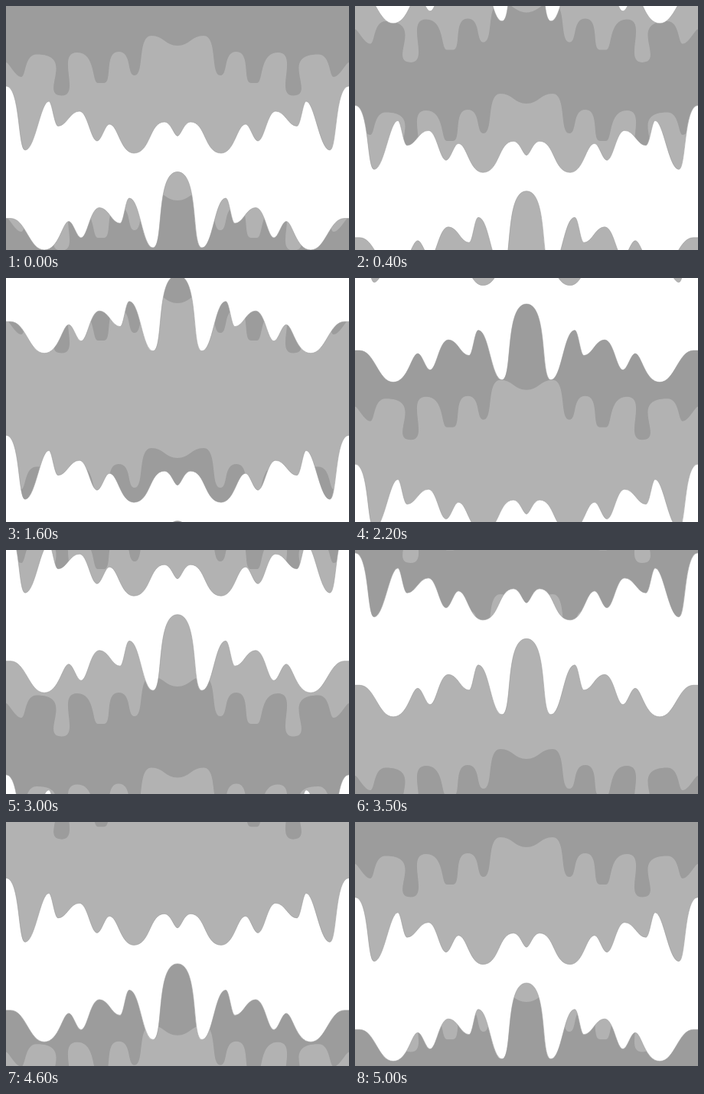
Write an HTML page with a canvas that moves like this. It is 448 by 320 pixels and loops after 5.1 s.

```html
<!DOCTYPE html>
<html lang="en">
<head>
<meta charset="utf-8">
<title>Dripping layers</title>
<style>
html, body { margin: 0; width: 100%; height: 100%; overflow: hidden; background: #fff; }
canvas { display: block; width: 448px; height: 320px; }
</style>
</head>
<body>
<canvas id="stage" width="448" height="320"></canvas>
<script>
const W = 448, H = 320, PERIOD = 322.5;
const STEP_MS = 100, STEPS = 51;
const LIGHT = '#b2b2b2', DARK = '#9c9c9c';
const ctx = document.getElementById('stage').getContext('2d');

// Crests and troughs of the left half: [x, y, softness before, softness after].
const drips = outline([
  [0, 105, .75], [25, 189, .38, .42], [56, 125, .35], [68, 157.5, .4],
  [96, 138, .45], [119, 177, .35], [135, 155, .35], [167, 193, .55],
  [207, 152, .5], [224, 170.5, .25]
]);
const crown = outline([
  [6, 278.5, .45], [50, 320, .45, .6], [82, 282.5, .25, .35], [98, 304, .35],
  [122, 264.5, .5, .45], [149, 285, .4], [161, 252, .4, .45],
  [192, 317, .45], [224, 217.5, .9]
]);
const seam = outline([
  [0, 74, .2], [20, 93, .4, .3], [40, 63.5, .8, 1.6], [73, 117.5, .94, 1.25],
  [93, 61, 1.4, .9], [120, 101, .3], [128, 101, .3, .6], [147, 60, 1, .85],
  [168, 91, .5, .6], [190, 39, .85, .45], [224, 52, .45]
]);

// Joins the key points with level-ended curves and mirrors them at the centre.
function outline(keys) {
  const half = [keys[0].slice(0, 2)];
  for (let i = 1; i < keys.length; i++) {
    const [x0, y0, before0, after0 = before0] = keys[i - 1];
    const [x1, y1, before1] = keys[i];
    const gap = x1 - x0;
    half.push([x0 + gap * after0, y0], [x1 - gap * before1, y1], [x1, y1]);
  }
  const mirrored = half.slice(0, -1).reverse().map(([x, y]) => [W - x, y]);
  return half.concat(mirrored);
}

function trace(points, dy) {
  ctx.lineTo(points[0][0], points[0][1] + dy);
  for (let i = 1; i < points.length; i += 3) {
    const [a, b, c] = points.slice(i, i + 3);
    ctx.bezierCurveTo(a[0], a[1] + dy, b[0], b[1] + dy, c[0], c[1] + dy);
  }
}

function band(top, topDy, bottom, bottomDy) {
  const first = top[0][1] + topDy, last = bottom[0][1] + bottomDy;
  ctx.moveTo(-4, first);
  trace(top, topDy);
  ctx.lineTo(W + 4, first);
  ctx.lineTo(W + 4, last);
  trace([...bottom].reverse(), bottomDy);
  ctx.lineTo(-4, last);
  ctx.closePath();
}

function bands(shift, top, topDy, bottom) {
  ctx.beginPath();
  for (let k = -2; k <= 0; k++) {
    const dy = shift + k * PERIOD;
    band(top, dy + topDy, bottom, dy + PERIOD);
  }
}

function draw(step) {
  const shift = step / STEPS * PERIOD;
  ctx.globalCompositeOperation = 'source-over';
  ctx.clearRect(0, 0, W, H);

  bands(shift, crown, 0, drips);
  ctx.fillStyle = LIGHT;
  ctx.fill();

  // The inner seam runs three times as fast as the body.
  ctx.globalCompositeOperation = 'source-atop';
  bands(shift * 3 % PERIOD, seam, 203, seam);
  ctx.fillStyle = DARK;
  ctx.fill();

  ctx.globalCompositeOperation = 'source-over';
  bands(shift, crown, 0, drips);
  ctx.strokeStyle = DARK;
  ctx.lineWidth = 0.6;
  ctx.stroke();

  ctx.globalCompositeOperation = 'destination-over';
  ctx.fillStyle = '#fff';
  ctx.fillRect(0, 0, W, H);
}

const start = performance.now();
function tick() {
  draw(Math.floor((performance.now() - start) / STEP_MS) % STEPS);
  requestAnimationFrame(tick);
}
tick();
</script>
</body>
</html>
```
